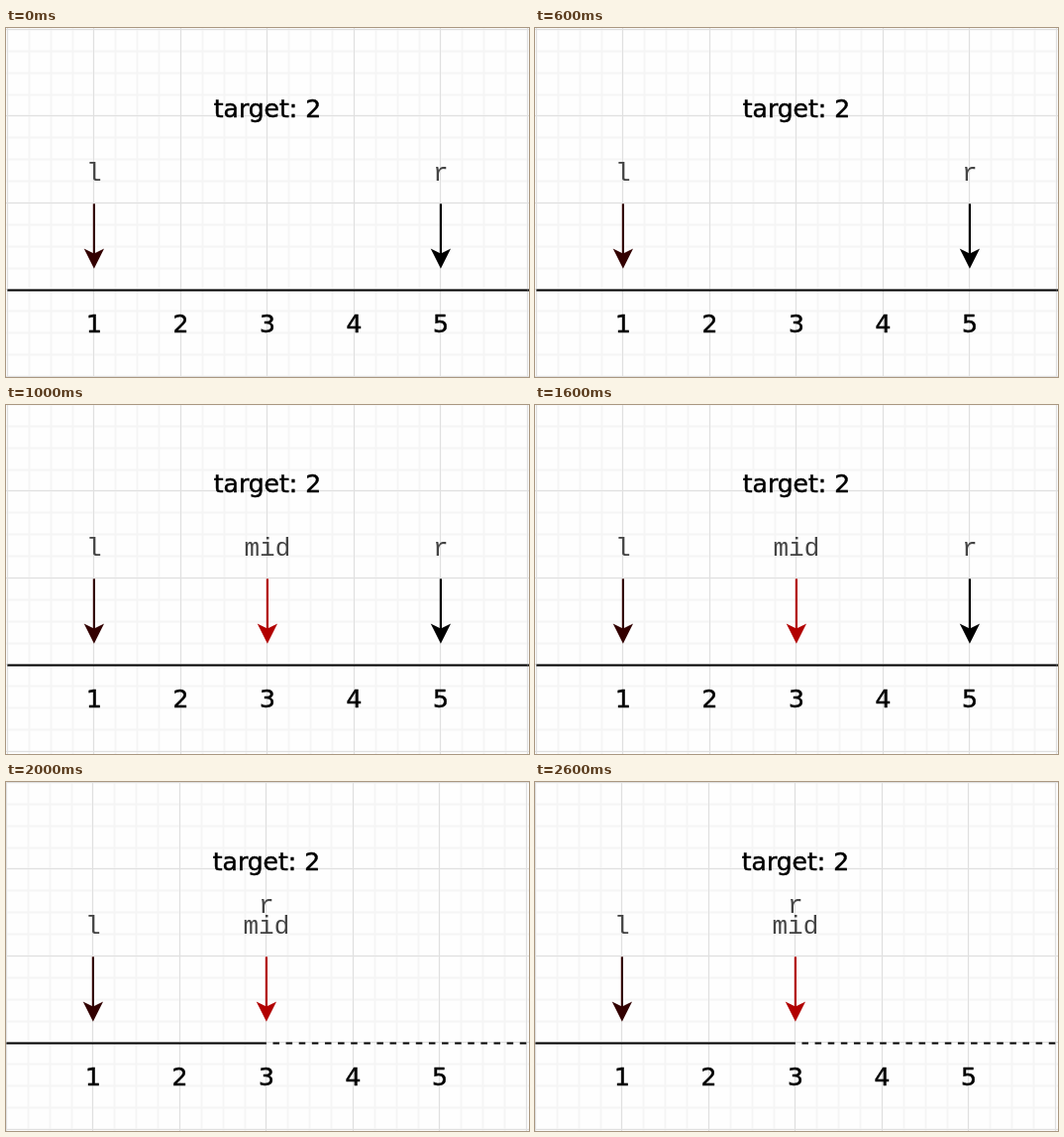
These frames come from a looping animation (528 by 352 pixels, 3000 ms). An HTML page with a canvas:

```html
<!DOCTYPE html>
<html lang="en">
<head>
<meta charset="utf-8">
<title>Binary search</title>
<style>
  html, body { margin: 0; height: 100%; overflow: hidden; }
  canvas { display: block; }
</style>
</head>
<body>
<canvas id="stage" width="528" height="352"></canvas>
<script>
const ctx = document.getElementById('stage').getContext('2d');
const CELL = 87.5, LEFT = 1.4, TOP = 1.4, AXIS_Y = 264.5, STROKE = 2.2, DASH = 6.56;
const HAND = '25px "DejaVu Sans", sans-serif';
const MONO = '26px "Liberation Mono", monospace';
const valueX = n => LEFT + n * CELL;

// Each step: view offset, arrows as [value, colour], labels as [text, value, baseline]
const L = ['l', 1, 154], MID = ['mid', 3, 154], R = ['r', 5, 154];
const DARK = '#330000', RED = '#b20000';
const steps = [
  { shift: [0, 0], arrows: [[1, DARK], [5, '#000']], labels: [L, R] },
  { shift: [0, -2], arrows: [[1, DARK], [3, RED], [5, '#000']], labels: [L, MID, R] },
  { shift: [-1, -1], arrows: [[1, DARK], [3, RED]], labels: [L, MID, ['r', 3, 133]], end: 3 }
];

function line(x1, y1, x2, y2, color, width) {
  ctx.strokeStyle = color;
  ctx.lineWidth = width;
  ctx.beginPath();
  ctx.moveTo(x1, y1);
  ctx.lineTo(x2, y2);
  ctx.stroke();
}

function gridLines(interval, color, width) {
  const snap = v => Math.floor(v) + 0.5;
  for (let d = 0; d <= 6 * CELL + interval; d += interval) {
    line(snap(LEFT + d), -5, snap(LEFT + d), 360, color, width);
    line(-5, snap(TOP + d), 535, snap(TOP + d), color, width);
  }
}

function arrow(x, color) {
  line(x, 177.3, x, 229, color, STROKE);
  ctx.fillStyle = color;
  ctx.beginPath();
  ctx.moveTo(x, 240.3);
  ctx.lineTo(x - 7.7, 225);
  ctx.lineTo(x, 228.8);
  ctx.lineTo(x + 7.7, 225);
  ctx.closePath();
  ctx.fill();
  ctx.stroke();
}

function text(str, x, y, font, color, weight = 0) {
  ctx.font = font;
  ctx.fillStyle = ctx.strokeStyle = color;
  ctx.fillText(str, x, y);
  if (weight) {
    ctx.lineWidth = weight;
    ctx.strokeText(str, x, y);
  }
}

function draw({ shift, arrows, labels, end = 6 }) {
  ctx.setTransform(1, 0, 0, 1, 0, 0);
  ctx.fillStyle = '#fefefe';
  ctx.fillRect(0, 0, 528, 352);
  ctx.translate(...shift);
  ctx.textAlign = 'center';

  gridLines(CELL / 4, '#f5f5f5', 2);
  gridLines(CELL, '#e0e0e0', 1);

  line(LEFT, AXIS_Y, valueX(end), AXIS_Y, '#000', STROKE);
  ctx.setLineDash([DASH, DASH]);
  line(valueX(end) + DASH, AXIS_Y, valueX(6), AXIS_Y, '#000', STROKE);
  ctx.setLineDash([]);

  text('target: 2', valueX(3), 90, HAND, '#000', 0.5);
  for (let n = 1; n <= 5; n++) text(n, valueX(n), 307, HAND, '#000', 0.5);
  for (const [n, color] of arrows) arrow(valueX(n), color);
  for (const [str, n, y] of labels) text(str, valueX(n), y, MONO, '#444');
}

const start = performance.now();
function tick() {
  const elapsed = performance.now() - start;
  draw(steps[Math.floor(elapsed / 1000) % steps.length]);
  requestAnimationFrame(tick);
}
tick();
</script>
</body>
</html>
```
